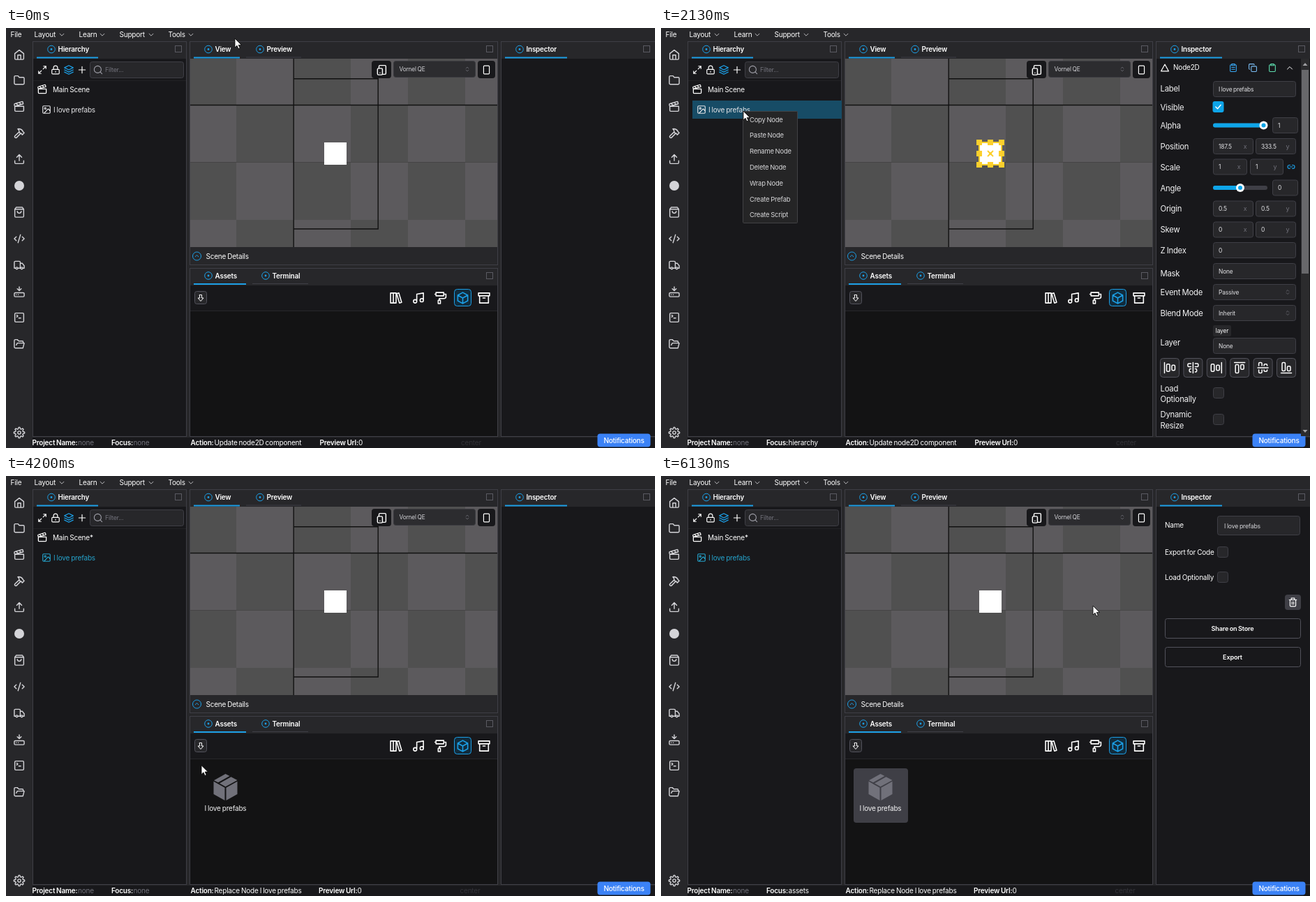
Recreate the animation shown at these times as an HTML page. Size 930x602 px, loop 7340 ms.

```html
<!DOCTYPE html>
<html lang="en">
<head>
<meta charset="utf-8">
<title>Scene editor</title>
<style>
html, body { margin: 0; width: 100%; height: 100%; overflow: hidden; background: #18181b; }
svg { display: block; }
text { font-family: Inter, sans-serif; letter-spacing: -.02em; word-spacing: -.06em; }
.ic { fill: none; stroke-linecap: round; stroke-linejoin: round; }
</style>
</head>
<body>
<svg id="stage" width="930" height="602" viewBox="0 0 930 602"></svg>
<script>
const BLUE = '#1c9fe6', LINE = '#3f3f46', BAR = '#27272a', BODY = '#18181b', GREY = '#71717a', LIGHT = '#d4d4d8';

const text = (x, y, s, size = 10, fill = '#fff', weight = 400, anchor = 'start', id = '') =>
  `<text id="${id}" x="${x}" y="${y}" font-size="${size}" fill="${fill}" font-weight="${weight}" text-anchor="${anchor}">${s}</text>`;
const box = (x, y, w, h, fill, r = 0, stroke = '') => stroke
  ? `<rect x="${x + .5}" y="${y + .5}" width="${w - 1}" height="${h - 1}" rx="${r}" fill="${fill}" stroke="${stroke}"/>`
  : `<rect x="${x}" y="${y}" width="${w}" height="${h}" rx="${r}" fill="${fill}"/>`;
const dot = (x, y, r, fill) => `<circle cx="${x}" cy="${y}" r="${r}" fill="${fill}"/>`;
const ring = (x, y, r) => `<circle cx="${x}" cy="${y}" r="${r}" fill="none" stroke="${BLUE}"/>`;
// Icon on a 24 unit grid, centred on x, y
const icon = (x, y, size, d, color = LIGHT, width = 2) =>
  `<path class="ic" transform="translate(${x - size / 2} ${y - size / 2}) scale(${size / 24})" d="${d}" stroke="${color}" stroke-width="${width}"/>`;
// Rounded rectangle as icon path data
const pill = (x, y, w, h) =>
  `M${x + 2} ${y}h${w - 4}q2 0 2 2v${h - 4}q0 2-2 2h${4 - w}q-2 0-2-2v${4 - h}q0-2 2-2z`;
const group = (id, s) => `<g id="${id}">${s}</g>`;

const DOWN = 'M5 9l7 7 7-7', UP = 'M5 16l7-7 7 7', SORT = 'M7 9l5-5 5 5M7 15l5 5 5-5';
const CLAP = 'M20 6 3 11 2 8q-.3-2 1.4-2.4l13.5-4q2-.4 2.5 1.3ZM6.2 5.3l3.1 3.9M12.4 3.4l3.1 4M3 11h18v8q0 2-2 2H5q-2 0-2-2Z';
const CLIP = 'M8 4H6q-2 0-2 2v14q0 2 2 2h12q2 0 2-2V6q0-2-2-2h-2M8 2h8v4H8z';
const IMAGE = pill(3, 3, 18, 18) + 'M7 9a2 2 0 1 0 4 0 2 2 0 1 0-4 0M21 15l-5-5L6 21';
const LOCK = pill(3, 11, 18, 11) + 'M12 15.5v2M7 11V7a5 5 0 0 1 10 0v4';
const WARN = 'M12 3 2 20h20ZM12 9v4M12 16.5v.1';

function gear() {
  let d = '';
  for (let i = 0; i < 96; i++) {
    const a = i * Math.PI / 48, r = 9.3 + 1.6 * Math.tanh(2.2 * Math.cos(8 * a));
    d += `${i ? 'L' : 'M'}${(12 + r * Math.cos(a)).toFixed(2)} ${(12 + r * Math.sin(a)).toFixed(2)}`;
  }
  return d + 'ZM9 12a3 3 0 1 0 6 0a3 3 0 1 0-6 0';
}

const tab = (x, y, s, x1, x2, on) => ring(x, y, 5.3) + dot(x, y, 1.4, BLUE) +
  text(x + 9.5, y + 3.5, s, 9.9, '#fff', 600) + box(x1, y + 11, x2 - x1, on ? 2 : 1, on ? BLUE : LINE);
const panel = (x, y, w, h) => box(x, y, w, h, BODY, 0, LINE) + box(x + 1, y + 1, w - 2, 24, BAR) +
  box(Math.min(x + w - 17, 913), y + 6, 10, 10, 'none', 0, '#5a5a62');

function frame() {
  let s = box(0, 0, 930, 602, BAR) + box(38, 587, 892, 15, BODY);
  s += text(6.5, 12.5, 'File');
  [['Layout', 40.5, 80], ['Learn', 104.5, 138], ['Support', 162.5, 208], ['Tools', 232.5, 265]]
    .forEach(([w, x, cx]) => s += text(x, 12.5, w) + icon(cx, 9.5, 10, DOWN));
  [ [38, 'M3 10l9-7 9 7v10q0 2-2 2H5q-2 0-2-2zM9 22v-9h6v9'],
    [75, 'M20 20q2 0 2-2V8q0-2-2-2h-8L9.5 3H4q-2 0-2 2v13q0 2 2 2Z'],
    [113, CLAP],
    [151, 'M15 12l-9 9q-2 .5-3-1t.5-3L12 9M18 15l4-4-3-3V7q-4-5-10-4 3 2 3 6l2 3h2z'],
    [188, 'M21 15v4q0 2-2 2H5q-2 0-2-2v-4M17 8l-5-5-5 5M12 3v12'],
    [264, 'M6 2 3 6v14q0 2 2 2h14q2 0 2-2V6l-3-4ZM3 6h18M16 10a4 4 0 0 1-8 0'],
    [302, 'M18 16l4-4-4-4M6 8l-4 4 4 4M14.5 4l-5 16'],
    [340, 'M5 18H2V6q0-2 2-2h8q2 0 2 2v12H9M14 8h4l4 5v5h-3M5 18a2 2 0 1 0 4 0a2 2 0 1 0-4 0M15 18a2 2 0 1 0 4 0a2 2 0 1 0-4 0'],
    [378, 'M12 2v8M16 6l-4 4-4-4M6 18h.1M10 18h.1' + pill(2, 14, 20, 8)],
    [415, pill(3, 3, 18, 18) + 'M7 11l2-2-2-2M11 13h4'],
    [453, 'M6 14l2-4h14l-2.5 10H4q-2 0-2-2V5q0-2 2-2h4l3 3h7q2 0 2 2v2'],
    [580, gear()]
  ].forEach(([y, d]) => s += icon(19, y, 17, d));
  s += dot(19, 226, 7, LIGHT);

  s += panel(38, 19, 221, 567) + tab(65, 30.5, 'Hierarchy', 44, 132, true);
  s += icon(52, 60, 14, 'M15 3h6v6M9 21H3v-6M21 3l-7 7M3 21l7-7', '#fff') + icon(71, 60, 14, LOCK, '#fff');
  s += icon(90, 60, 15, 'M12 2l10 5-10 5L2 7zM2 12l10 5 10-5M2 17l10 5 10-5', BLUE) + icon(109, 60, 14, 'M4 12h16M12 4v16', '#fff');
  s += box(120, 48, 135, 24, BAR, 3, LINE) + icon(132, 60, 15, 'M3 11a8 8 0 1 0 16 0a8 8 0 1 0-16 0M21 21l-4-4', '#a1a1aa', 1.7);
  s += text(142, 63, 'Filter...', 8.8, GREY) + box(39, 75, 219, 1, '#222225') + icon(52, 88, 15, CLAP, '#fff');

  s += panel(263, 19, 442, 321) + tab(290, 30.5, 'View', 269, 335, true) + tab(364, 30.5, 'Preview', 344, 423);
  s += viewport() + box(264, 314, 440, 25, BAR);
  s += ring(273.5, 327, 6) + icon(273.5, 326.5, 8, UP, BLUE, 3) + text(286.5, 330.5, 'Scene Details');

  s += panel(263, 344, 442, 242) + tab(290, 355, 'Assets', 269, 344, true) + tab(372, 355, 'Terminal', 353, 433);
  s += box(264, 406, 440, 179, '#131314') + box(264, 405, 440, 1, BAR);
  s += box(270, 377, 18, 19, BAR, 3, '#52525b') + icon(279, 387, 12, 'M9 3h6v9h5l-8 9-8-9h5z', '#fff');
  s += icon(559, 387, 19, 'M2 3h5v18H2zM7 3h5v18H7zM13 4l4-1 5 17-4 1z', '#fff') +
    icon(591, 387, 19, 'M9 18V5l12-2v13M3 18a3 3 0 1 0 6 0a3 3 0 1 0-6 0M15 16a3 3 0 1 0 6 0a3 3 0 1 0-6 0', '#fff') +
    icon(622.5, 387, 19, 'M4 2h14v6H4zM18 5h4v6q-1 2-3 2h-9v3M8 16h4v6H8zM4 5H2', '#fff');
  s += box(642, 374, 25, 25, '#112c3d', 4, BLUE) + icon(654.5, 387, 19, 'M12 2l9 5v10l-9 5-9-5V7zM3 7l9 5 9-5M12 12v10', BLUE);
  s += icon(685, 387, 19, 'M2 3h20v5H2zM4 8v13h16V8M10 12h4', '#fff');

  s += panel(709, 19, 222, 567) + tab(736, 30.5, 'Inspector', 715, 804, true);
  s += text(37.5, 597.5, 'Project Name:', 10, '#fff', 600) + text(103, 597.5, 'none', 10, GREY);
  s += text(151, 597.5, 'Focus:', 10, '#fff', 600) + text(182.5, 597.5, '', 10, GREY, 400, 'start', 'focus');
  s += text(264.5, 597.5, 'Action:', 10, '#fff', 600) + text(298.5, 597.5, '', 10, '#fff', 400, 'start', 'action');
  s += group('after', text(449.5, 597.5, 'Preview Url:', 10, '#fff', 600) + text(505, 597.5, '0') + text(652, 597.5, 'center', 10, '#333338'));
  return s + box(847.5, 581.5, 76, 19, '#3b82f6', 4) + text(885.5, 594.5, 'Notifications', 10, '#fff', 500, 'middle');
}

function viewport() {
  const xs = [264, 330, 412, 494, 576, 658, 704], ys = [44, 110.5, 192.5, 275, 314];
  let s = '';
  for (let j = 0; j < 4; j++) for (let i = 0; i < 6; i++)
    s += box(xs[i], ys[j], xs[i + 1] - xs[i], ys[j + 1] - ys[j], (i + j) % 2 ? '#5c5a5d' : '#505050');
  s += '<path d="M412.2 44V314M264 110.5H704M412.2 72.7H533.2V288H412.2" fill="none" stroke="#111" stroke-width="1.4"/>';
  s += box(524, 47, 28, 25, BODY, 4) + icon(538, 60, 17, 'M7 8V5q0-2 2-2h10q2 0 2 2v14q0 2-2 2h-4M9 18h.1' + pill(4, 9, 10, 13), '#fff');
  s += box(555, 47, 118, 24, '#2c2c2f', 3, '#3a3a3f') + text(563.5, 62, 'Vornel QE', 8.3, LIGHT) + icon(661, 59, 9, SORT, GREY);
  s += box(676, 47, 25, 25, BODY, 4) + icon(688.5, 60, 14, pill(5, 2, 14, 20), '#fff');
  return s + box(456, 164, 32, 32, '#fff');
}

function handles() {
  const Y = '#fccf2c';
  let s = `<rect x="456" y="164" width="32" height="32" fill="none" stroke="${Y}" stroke-width="2"/>`;
  for (let i = 0; i < 9; i++) if (i !== 4) s += box(452 + i % 3 * 16, 160 + Math.floor(i / 3) * 16, 8, 8, Y);
  return s + `<path d="M468 176l8 8M476 176l-8 8" stroke="${Y}" stroke-width="1.8"/>` + dot(472, 180, 2.2, Y);
}

const field = (x, y, w, s, unit = '') => box(x, y - 11.5, w, 23, BAR, 3, LINE) + text(x + 8, y + 3, s, 8.4, '#e4e4e7') +
  (unit && text(x + w - 12, y + 3, unit, 9, GREY, 400, 'middle'));
const check = (x, y) => box(x, y, 16, 16, BAR, 3, LINE);
const slider = (y, v) => box(791, y - 3, 78, 6, LINE, 3) + box(791, y - 3, v, 6, '#0ea5e9', 3) +
  dot(791 + v, y, 6, '#fff') + dot(791 + v, y, 3, '#0ea5e9');

function nodeInspector() {
  let s = icon(722, 57, 13, 'M12 3 2 21h20Z', '#fff') + text(734, 60, 'Node2D');
  s += icon(820, 57, 13, CLIP + 'M8 11h8M8 16h8', '#38a9f5') +
    icon(848, 57, 13, pill(8, 8, 14, 14) + 'M4 16q-2 0-2-2V4q0-2 2-2h10q2 0 2 2', '#7cc0f8') +
    icon(876, 57, 13, CLIP, '#5ee0b0') + icon(901, 57, 12, UP, '#fff');
  [['Label', 91], ['Visible', 117.5], ['Alpha', 143.5], ['Position', 173.5], ['Scale', 203.5], ['Angle', 233.5], ['Origin', 263],
   ['Skew', 293], ['Z Index', 323], ['Mask', 356], ['Event Mode', 382.5], ['Blend Mode', 412.5], ['Layer', 454.5],
   ['Load', 520.5], ['Optionally', 536], ['Dynamic', 558], ['Resize', 574]]
    .forEach(([w, y]) => s += text(715.5, y, w, 11.3, '#f4f4f5'));
  s += field(791, 87.5, 119, 'I love prefabs') + box(790.5, 105, 16, 16, '#0ea5e9', 3) + icon(798.5, 113, 11, 'M4 12l6 6L20 6', '#fff', 3);
  s += slider(139.5, 72.5) + field(876, 139.5, 37, '1') + slider(229, 39) + field(876, 229, 37, '0');
  [[169.5, '187.5', '333.5'], [259, '0.5', '0.5'], [289, '0', '0']]
    .forEach(([y, a, b]) => s += field(791, y, 58, a, 'x') + field(852, y, 58, b, 'y'));
  s += field(791, 199, 49, '1', 'x') + field(844, 199, 48, '1', 'y');
  s += icon(903, 199, 12, 'M9 17H7A5 5 0 0 1 7 7h2M15 7h2a5 5 0 1 1 0 10h-2M8 12h8', BLUE, 2.4);
  [[318.5, '0'], [348.5, 'None'], [378.5, 'Passive', 1], [408.5, 'Inherit', 1], [455.5, 'None']]
    .forEach(([y, w, sel]) => s += field(791, y, 119, w) + (sel ? icon(898, y, 9, SORT, GREY) : ''));
  s += box(791, 426, 26, 16, BAR, 2) + text(804, 437, 'layer', 8.4, '#fff', 400, 'middle');
  ['M2 2v20' + pill(6, 5, 6, 14) + pill(16, 7, 6, 10),
   'M12 2v20M8 10H4q-2 0-2-2V6q0-2 2-2h4M16 10h4q2 0 2-2V6q0-2-2-2h-4M8 20H7q-2 0-2-2v-2q0-2 2-2h1M16 14h1q2 0 2 2v2q0 2-2 2h-1',
   'M22 2v20' + pill(2, 5, 6, 14) + pill(12, 7, 6, 10),
   'M22 2H2' + pill(4, 6, 6, 16) + pill(14, 6, 6, 9),
   'M2 12h20M10 16v4q0 2-2 2H6q-2 0-2-2v-4M10 8V4q0-2-2-2H6q-2 0-2 2v4M20 16v1q0 2-2 2h-2q-2 0-2-2v-1M14 8V7q0-2 2-2h2q2 0 2 2v1',
   'M22 22H2' + pill(4, 2, 6, 16) + pill(14, 9, 6, 9)]
    .forEach((d, i) => s += box(715 + i * 33.4, 473, 28, 28, BAR, 4, '#52525b') + icon(729 + i * 33.4, 487, 18, d, '#fff'));
  s += check(791, 515) + check(791, 553);
  return s + box(917, 44, 12, 541, '#2b2b2d') + box(918, 60, 10, 292, '#68686b') +
    '<path d="M919.5 54l3.5-4 3.5 4zM919.5 576l3.5 4 3.5-4z" fill="#a0a0a3"/>';
}

function assetInspector() {
  let s = text(722, 74, 'Name') + box(797, 57, 119, 28, BAR, 3, LINE) + text(807, 74.5, 'I love prefabs', 8.7, LIGHT);
  s += text(722, 112.5, 'Export for Code') + check(797, 101) + text(722, 148.5, 'Load Optionally') + check(797, 137);
  s += box(894, 170, 23, 22, LINE, 4) + icon(905.5, 181, 14, 'M3 6h18M5 6v14q0 2 2 2h10q2 0 2-2V6M8 6V2h8v4M10 11v6M14 11v6', '#fff');
  [[204, 'Share on Store'], [245, 'Export']].forEach(([y, w]) =>
    s += box(722, y, 195, 29, BODY, 3, '#52525b') + text(819, y + 18.2, w, 9.1, '#fff', 600, 'middle'));
  return s;
}

const ITEMS = ['Copy Node', 'Paste Node', 'Rename Node', 'Delete Node', 'Wrap Node', 'Create Prefab', 'Create Script'], STEP = 22.8;
const menu = () => box(117, 119, 79, 161, '#252526', 1, '#424245') + '<rect id="item" x="118" width="77" height="22.8" fill="#363638"/>' +
  ITEMS.map((w, i) => text(127, 134.5 + i * STEP, w, 9.4, '#d8d8da')).join('');

const asset = () => '<rect id="tile" x="276" y="419" width="78" height="78" rx="4"/>' +
  `<path fill="${GREY}" d="M314.5 427l6 3-16.5 9.2-6-3zM322.5 431.2l9 4.800-17 9.200-8.500-4.800zM297.500 437.8l16 9v18.200l-16-9zM331.500 437.8l-16 9v18.200l16-9z"/>` +
  text(314.5, 480, 'I love prefabs', 10, '#f4f4f5', 400, 'middle');

stage.innerHTML = frame() + group('handles', handles()) +
  '<rect id="row" x="45.5" y="104.5" width="213" height="25"/>' +
  text(67, 91.5, '', 10, '#fff', 400, 'start', 'scene') +
  group('node', icon(58, 117, 14, IMAGE, 'currentColor') + text(68, 120.5, 'I love prefabs', 10, 'currentColor')) +
  group('tools', icon(231, 117.5, 10, 'M2 12q10-15 20 0q-10 15-20 0M9 12a3 3 0 1 0 6 0a3 3 0 1 0-6 0', LIGHT) +
    icon(244.5, 117.5, 11, 'M4 11h16v11H4zM7 11V7q0-5 5-5 4 0 5 4', LIGHT)) +
  group('warn', icon(136, 117, 10, WARN, '#ef4444')) +
  group('asset', asset()) + group('nodePane', nodeInspector()) + group('assetPane', assetInspector()) + group('menu', menu()) +
  '<g id="cursor" fill="#fff" stroke="#000" stroke-width=".8">' +
  '<path id="arrow" d="M0 0V13l3-2.8 2 4.6 2.2-1-2-4.4h4.2z"/>' +
  '<path id="hand" d="M-1.500 1.500q1.500-2.600 3 0v4.700q2-.9 2.300.3 2-.7 2.400.5 2-.4 2.200 1.200v3.600l-1.500 2.800v1.500h-7.500v-1.200l-3.400-4.600q-1-2 .8-2l1.700 1.300z"/></g>';

const $ = id => document.getElementById(id);
const show = (id, on) => $(id).style.display = on ? '' : 'none';

// Cursor path: tick (1/15 s), x, y
const PATH = [[0, 328, 15], [3, 255, 38], [6, 125, 84], [9, 51, 109], [12, 80, 106], [15, 75, 118], [22, 75, 118], [25, 92, 133],
  [28, 118, 119], [35, 118, 119], [39, 135, 165], [44, 169, 228], [47, 157, 248], [58, 157, 248], [61, 228, 350], [64, 306, 447],
  [66, 306, 447], [68, 311, 443.5], [73, 311, 443.5], [76, 299, 456], [79, 318, 470], [81, 335, 456], [83, 324, 440],
  [84, 315, 463], [88, 450, 340], [92, 619, 186]];

function cursorAt(n) {
  const i = PATH.findIndex(p => p[0] > n);
  if (i < 0) return PATH[PATH.length - 1].slice(1);
  const [n0, x0, y0] = PATH[i - 1], [n1, x1, y1] = PATH[i], k = (n - n0) / (n1 - n0);
  return [x0 + (x1 - x0) * k, y0 + (y1 - y0) * k];
}

function draw(now) {
  const n = Math.floor((now % 7340 + 3.4) * .015), [x, y] = cursorAt(n);
  const picked = n >= 20 && n < 52, open = n >= 32 && n < 52, made = n >= 53;
  const onRow = !open && x > 45 && x < 259 && y >= 104 && y < 130;
  const onItem = open && y > 120, onTile = made && x > 276 && x < 354 && y > 419 && y < 497;

  show('row', picked);
  $('row').setAttribute('fill', onRow ? '#126d97' : '#174c66');
  $('row').setAttribute('stroke', onRow ? '#1a86b8' : '#174c66');
  show('handles', picked);
  show('nodePane', picked);
  show('tools', onRow);
  show('menu', open);
  show('item', onItem);
  $('item').setAttribute('y', 120 + STEP * Math.floor((y - 120) / STEP));
  show('warn', n === 53);
  show('asset', made);
  show('assetPane', n >= 70);
  $('tile').setAttribute('fill', n >= 70 ? LINE : onTile ? BAR : 'none');
  $('node').style.color = made ? '#25a3cc' : '#e4e4e7';
  $('scene').textContent = made ? 'Main Scene*' : 'Main Scene';
  const focus = n >= 67 ? 'assets' : n >= 20 && n < 50 ? 'hierarchy' : 'none';
  $('focus').textContent = focus;
  $('focus').setAttribute('fill', focus === 'none' ? GREY : '#fff');
  $('action').textContent = made ? 'Replace Node I love prefabs' : 'Update node2D component';
  $('after').setAttribute('transform', `translate(${made ? -1.5 : 0})`);

  const hand = onRow || onItem || onTile;
  show('hand', hand);
  show('arrow', !hand);
  $('cursor').setAttribute('transform', `translate(${x} ${y})`);
  requestAnimationFrame(draw);
}
draw(performance.now());
</script>
</body>
</html>
```
